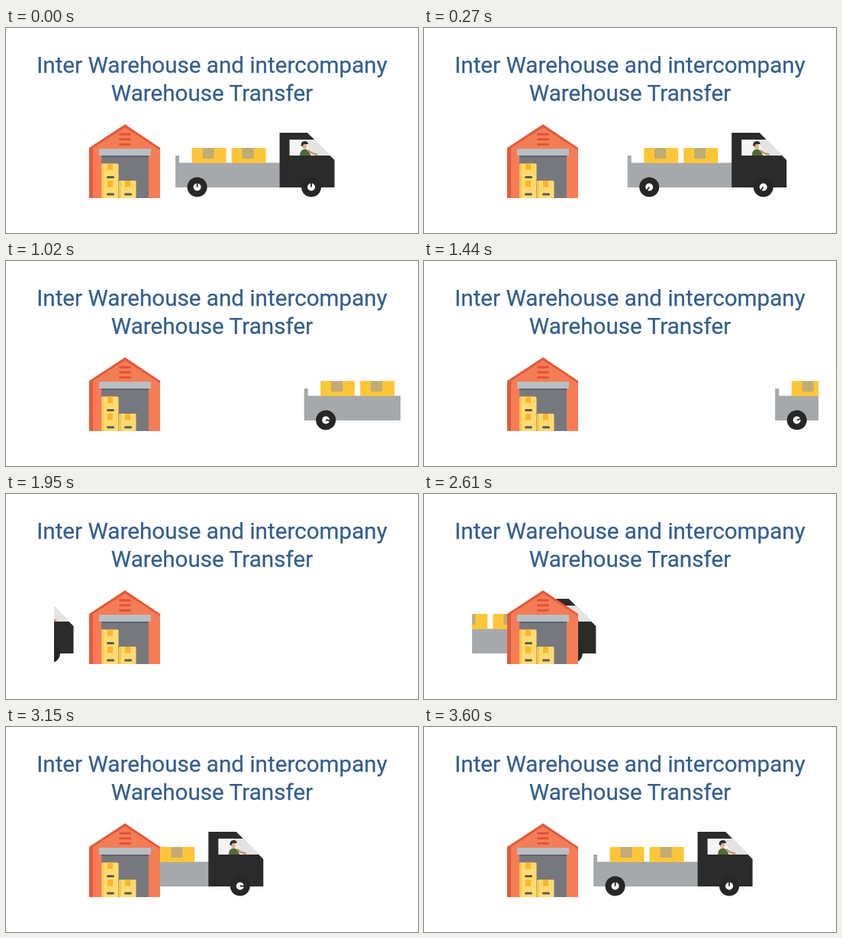
Write an HTML page that moves like this. It is 540 by 270 pixels and loops after 4050 ms.

```html
<!DOCTYPE html>
<html lang="en">
<head>
<meta charset="utf-8">
<title>Warehouse transfer</title>
<style>
  html, body { margin: 0; width: 100%; height: 100%; overflow: hidden; background: #fff; }
  svg { display: block; width: 540px; height: 270px; }
  text { font: 29.65px Roboto, sans-serif; fill: #345f8f; stroke: #345f8f; stroke-width: .25; text-anchor: middle; }
</style>
</head>
<body>
<svg viewBox="0 0 540 270">
  <defs>
    <clipPath id="road"><rect x="63" y="130" width="454" height="100"/></clipPath>
    <g id="cargo">
      <path fill="#fdc638" d="M0 0h45v20H0z"/>
      <path fill="#c1ac76" d="M14 0h15v14H14z"/>
    </g>
    <g id="carton">
      <rect width="22.5" height="23" rx="1.5" fill="#ffda70"/>
      <path fill="#f6c850" d="M0 1.5Q0 0 1.5 0H3v23H1.5Q0 23 0 21.5z"/>
      <path fill="#fdb52c" d="M8 0h7v9l-3.500-1L8 9z"/>
      <rect x="7" y="16.500" width="10" height="3" rx="1.500" fill="#5d5a55"/>
    </g>
    <g id="wheel">
      <circle r="13" fill="#262626"/>
      <circle r="5" fill="#f7f7f7"/>
      <path stroke="#262626" stroke-width="1.800" d="M0-5.500V0"/>
    </g>
  </defs>

  <text x="270" y="59">Inter Warehouse and intercompany</text>
  <text x="270" y="96">Warehouse Transfer</text>

  <g clip-path="url(#road)">
    <g id="truck">
      <path fill="#a6a9ab" d="M222.500 168h5v9.500H360V210H222.500z"/>
      <use href="#cargo" x="244" y="158"/>
      <use href="#cargo" x="296" y="158"/>
      <path fill="#2b2b2b" d="M359 138h36.500l9 9L425 168l6 6v36h-72z"/>
      <path fill="#f5f5f5" d="M372 147h32.500L425 168h-53z"/>
      <path fill="#e3e3e4" d="M391 147h13.500L426 168h-21z"/>
      <path fill="#4f6b38" d="M385.500 168q0-8 6.500-8.500 5 0 8 8.500z"/>
      <path fill="none" stroke="#c98f68" stroke-width="2.400" d="M396.500 161l5 4 7 2"/>
      <ellipse cx="391.500" cy="155.500" rx="3" ry="3.800" fill="#e5ad86"/>
      <path fill="#27302a" d="M387 155q0-6 5-6 4 0 4.500 4h-6l-1.500 3z"/>
      <g transform="translate(251 209.500)"><use class="wheel" href="#wheel"/></g>
      <g transform="translate(400.500 209.500)"><use class="wheel" href="#wheel"/></g>
    </g>
  </g>

  <g>
    <path fill="#f57d56" d="M156 127l46 31v66h-93v-66z"/>
    <path fill="#e25a3d" d="M109 158l47-31 46 31v3l-46-30-42 27v66h-5z"/>
    <path stroke="#df5238" stroke-width="2.800" stroke-linecap="round" d="M149.500 140h13m-13 6.700h13m-13 6.600h13"/>
    <path fill="#77787d" d="M125 167h62v57h-62z"/>
    <path fill="#626368" d="M125 167h62v3h-62z"/>
    <rect x="122" y="159" width="68" height="9" rx="1" fill="#b8bfc4"/>
    <use href="#carton" x="125" y="178.500"/>
    <use href="#carton" x="125" y="201"/>
    <use href="#carton" x="148" y="201"/>
  </g>
</svg>
<script>
  const LOOP = 4050, STEP = 30, LEG = 60;
  const truck = document.getElementById('truck');
  const wheels = document.querySelectorAll('.wheel');

  // Leave to the right, re-enter from the left, then rest.
  function draw(now) {
    const step = Math.min(Math.floor(now % LOOP / STEP), 2 * LEG);
    const leaving = step < LEG;
    const x = leaving ? step * 4.96 : (step - 2 * LEG) * 6.22;
    const turns = leaving ? step / LEG * 4 : (step / LEG - 1) * 3;
    truck.setAttribute('transform', `translate(${x - 0.4})`);
    for (const wheel of wheels) wheel.setAttribute('transform', `rotate(${turns * 360})`);
  }

  let start;
  requestAnimationFrame(function tick(now) {
    start ??= now;
    draw(now - start);
    requestAnimationFrame(tick);
  });
</script>
</body>
</html>
```
